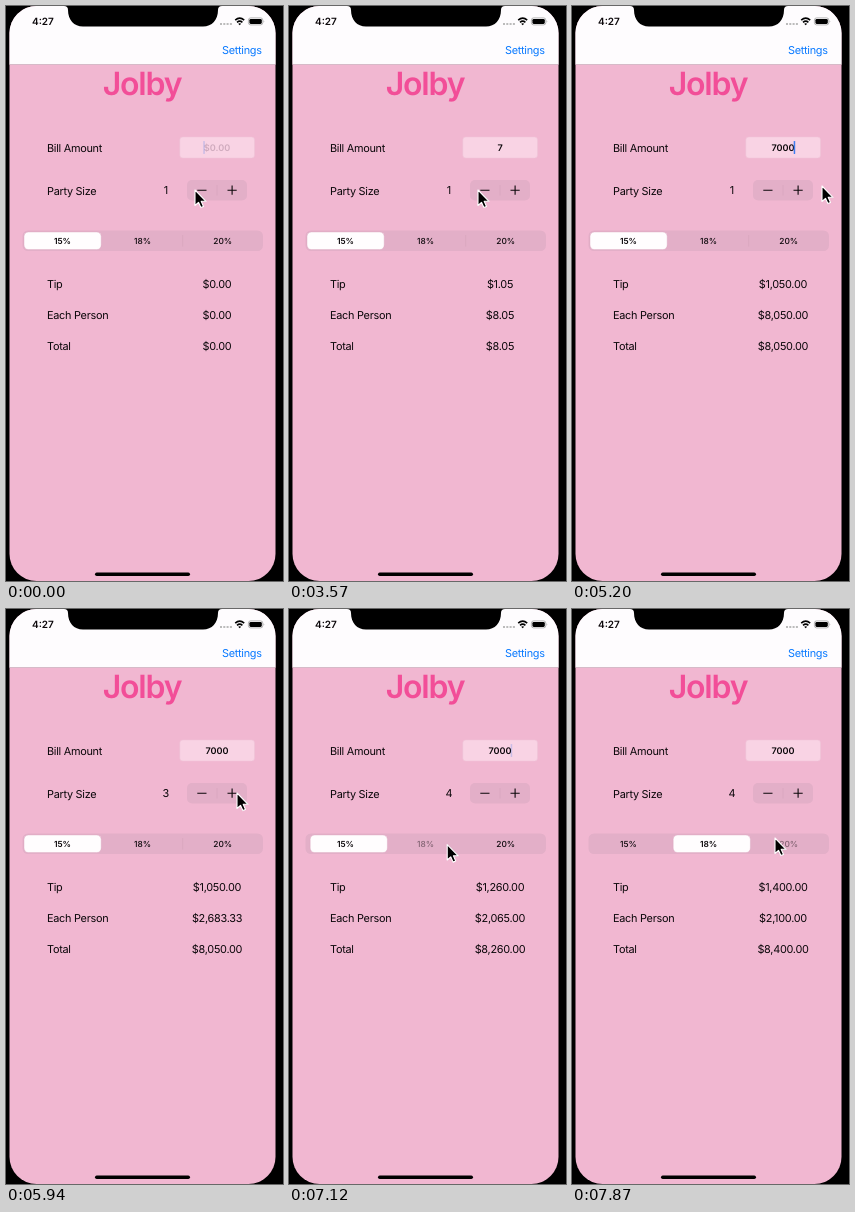
An HTML page that plays this animation: 277 by 575 pixels, repeating every 8 s.

```html
<!DOCTYPE html>
<html lang="en">
<head>
<meta charset="utf-8">
<title>Tip calculator</title>
<style>
  html, body { margin: 0; width: 100%; height: 100%; overflow: hidden; background: #000; }
  svg { display: block; width: 277px; height: 575px; }
  text {
    font: 400 10.9px Inter, "Open Sans", sans-serif; letter-spacing: -.28px;
    fill: #0b070a; text-rendering: geometricPrecision;
  }
  .mid { text-anchor: middle; }
  .field { font-size: 9.1px; font-weight: 600; letter-spacing: 0; }
  .seg { font-size: 8.4px; letter-spacing: 0; }
  .track { fill: #e3afc8; }
  .rule { stroke: #d8a6be; stroke-width: .8; }
</style>
</head>
<body>
<svg viewBox="0 0 277 575">
  <defs>
    <clipPath id="screen"><rect x="3.5" width="266" height="575" rx="27"/></clipPath>
  </defs>
  <rect width="277" height="575"/>
  <g clip-path="url(#screen)">
    <rect width="277" height="575" fill="#f1b7d1"/>
    <rect width="277" height="58" fill="#fefcfe"/>
    <path d="M0 58.5H277" stroke="#d6bac8"/>
  </g>
  <path d="M58 0Q62 0 62 4C62 14 68 20.5 77 20.5H197C206 20.5 212 14 212 4Q212 0 216 0Z"/>

  <!-- status bar -->
  <text x="26" y="19" style="font-size:10px;font-weight:600;letter-spacing:0">4:27</text>
  <path d="M214 18H226" stroke="#bbb" stroke-width="1.8" stroke-dasharray="2 1.3"/>
  <path d="M229.2 14.2Q233.7 10.2 238.2 14.2M231 16.3Q233.7 14 236.4 16.3" fill="none" stroke="#000" stroke-width="1.6"/>
  <path d="M232.2 17.7Q233.7 16.6 235.2 17.7L233.7 19.2Z"/>
  <rect x="242.4" y="11.9" width="14.4" height="7" rx="2.2" fill="none" stroke="#999" stroke-width=".7"/>
  <rect x="243.4" y="12.9" width="12.4" height="5" rx="1.3"/>
  <path d="M257.7 14.2Q258.9 15.4 257.7 16.6Z" fill="#999"/>

  <text x="216" y="48.4" style="fill:#0a7aff">Settings</text>
  <text class="mid" x="136" y="89" style="font-size:32px;font-weight:600;letter-spacing:-1.2px;fill:#f24e98">Jolby</text>

  <text x="41" y="146">Bill Amount</text>
  <rect x="173.8" y="131" width="74.7" height="21" rx="3" fill="#f9d3e4" stroke="#ecc3d7" stroke-width=".5"/>
  <text class="mid field" id="bill" x="211" y="145"></text>
  <rect id="caret" y="135" width="1.5" height="13" rx=".6" fill="#3f7df0"/>

  <text x="41" y="189">Party Size</text>
  <text class="mid" id="size" x="159.8" y="188"></text>
  <rect class="track" x="181" y="174" width="60" height="20.5" rx="5"/>
  <path class="rule" d="M211 179V189.5"/>
  <path d="M191.3 184.2H200.5M221.5 184.2H230.7M226.1 179.6V188.8" stroke="#0b070a" stroke-width="1.1"/>

  <rect class="track" x="16.5" y="224.5" width="240.5" height="20.5" rx="5.5"/>
  <path class="rule" id="divider" d="M176.7 229V240.5"/>
  <rect id="pill" y="226" width="77.2" height="17.6" rx="4.5" fill="#fffdfe" stroke="#d9a5be" stroke-width=".4"/>
  <text class="mid seg" x="56.5" y="237.6">15%</text>
  <text class="mid seg" x="136.6" y="237.6">18%</text>
  <text class="mid seg" x="216.7" y="237.6">20%</text>

  <text x="41" y="282">Tip</text>
  <text x="41" y="313">Each Person</text>
  <text x="41" y="344">Total</text>
  <text class="mid" id="tip" x="211" y="281.5"></text>
  <text class="mid" id="each" x="211" y="312.5"></text>
  <text class="mid" id="total" x="211" y="343.5"></text>

  <rect x="89" y="566.5" width="95" height="3.4" rx="1.7"/>
  <path id="pointer" d="M0 0V15.5L3.5 12.3L5.9 17.6L8.5 16.5L6.2 11.3H11Z"
        stroke="#fff" stroke-width="1.1" stroke-linejoin="round"/>
</svg>
<script>
const LOOP = 8000, STEP = 148.5;
const KEYS = [19, 26, 27, 28];   // 7, 0, 0, 0
const PLUS = [38, 40, 41];       // taps on the stepper
const PICKS = [48, 53];          // taps on 18% and 20%
const RATES = [15, 18, 20];
const STOPS = [                  // pointer: step, x, y
  [32, 189, 184], [35, 250, 180], [38, 231, 184], [41, 231, 184],
  [44, 170, 230], [47, 152, 235], [50, 176, 237], [52, 203, 229]
];

const $ = id => document.getElementById(id);
const segs = document.querySelectorAll('.seg');
const usd = n => n.toLocaleString('en-US', { style: 'currency', currency: 'USD' });
const clamp = v => Math.min(1, Math.max(0, v));
const ease = v => (v = clamp(v)) * v * (3 - 2 * v);
const past = (events, n) => events.filter(e => e <= n).length;

function pointerAt(n) {
  const i = Math.max(1, STOPS.findIndex(s => s[0] >= n));
  const [a, b] = n > STOPS.at(-1)[0] ? STOPS.slice(-2) : [STOPS[i - 1], STOPS[i]];
  const f = ease((n - a[0]) / (b[0] - a[0]));
  return [1, 2].map(k => a[k] + (b[k] - a[k]) * f);
}

// Blinks every seven steps, restarting at each key press
function caretAt(n) {
  const since = KEYS[past(KEYS, n) - 1] ?? 1;
  const phase = (n - since + 7) % 7;
  return phase < 4 ? 1 : phase < 6 ? 0 : .25;
}

function draw(now) {
  const n = Math.floor((now % LOOP + 10) / STEP);
  const typed = past(KEYS, n), picked = past(PICKS, n);
  const bill = typed && 7 * 10 ** (typed - 1);
  const size = 1 + past(PLUS, n);
  const tip = bill * RATES[picked] / 100, total = bill + tip;

  $('bill').textContent = bill || '$0.00';
  $('bill').style.fill = bill ? '' : '#d0abbe';
  $('caret').setAttribute('x', bill ? 210.5 + typed * 2.8 : 197.3);
  $('caret').setAttribute('opacity', caretAt(n));
  $('size').textContent = size;
  $('tip').textContent = usd(tip);
  $('each').textContent = usd(total / size);
  $('total').textContent = usd(total);

  const slide = PICKS.reduce((sum, p) => sum + (n < p ? 0 : ease((n - p + .3) / 2.5)), 0);
  const shown = Math.round(slide);
  $('pill').setAttribute('x', 18 + 80 * slide);
  $('divider').setAttribute('opacity', picked ? 0 : 1);
  segs.forEach((seg, i) => {
    seg.style.fontWeight = i === shown ? 600 : 500;
    seg.setAttribute('opacity', i === picked && i !== shown ? .45 : 1);
  });
  $('pointer').setAttribute('transform', `translate(${pointerAt(n)})`);
}

const start = performance.now();
function tick() {
  draw(performance.now() - start);
  requestAnimationFrame(tick);
}
tick();
</script>
</body>
</html>
```
